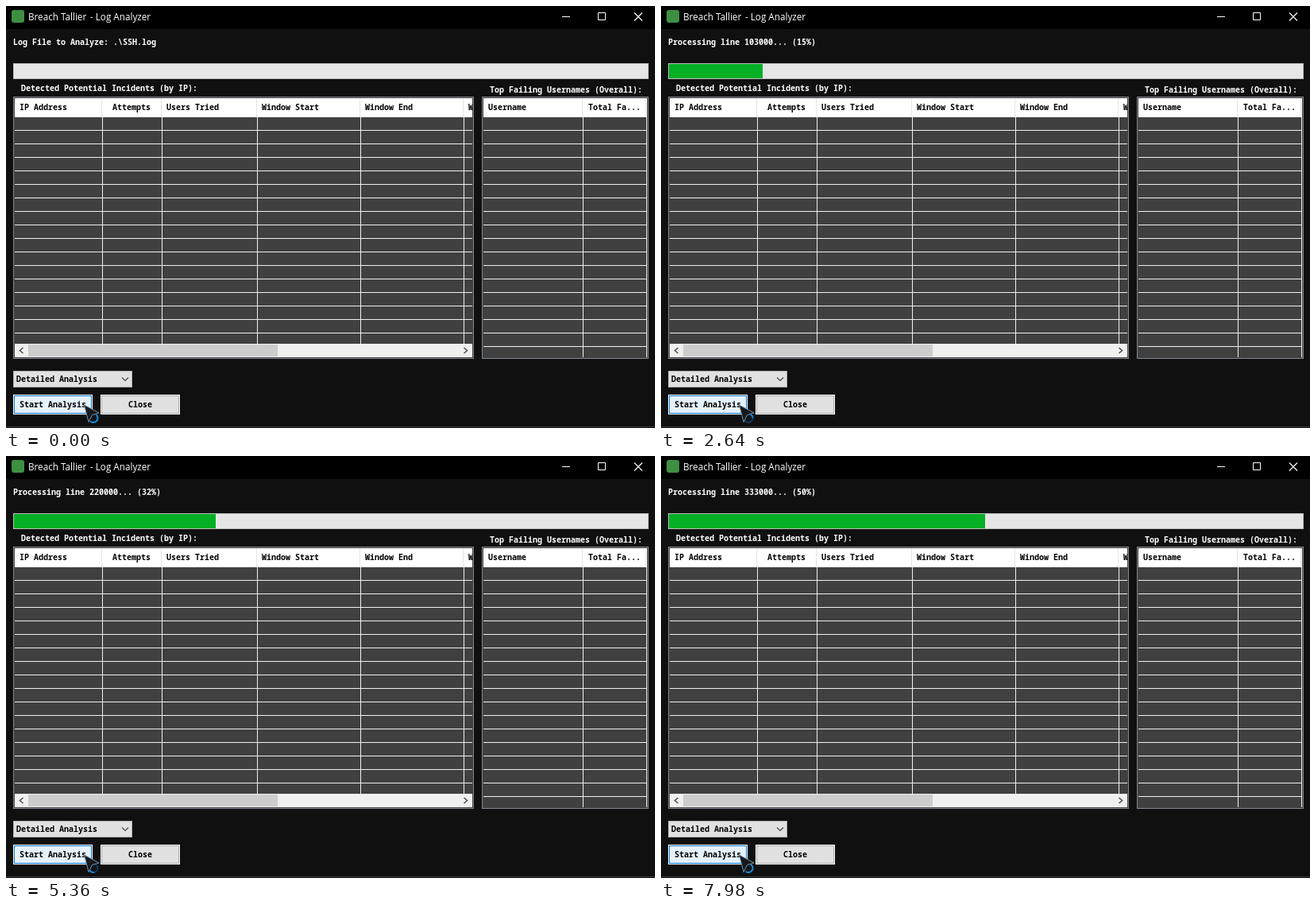
Animation, 817 px wide and 531 px high, one loop 8 s. Source, as an HTML page:

```html
<!DOCTYPE html>
<html lang="en">
<head>
<meta charset="utf-8">
<title>Breach Tallier - Log Analyzer</title>
<style>
  html, body { margin: 0; width: 100%; height: 100%; overflow: hidden; background: #101010; }
  svg { display: block; width: 817px; height: 531px; }
  text { font: bold 10px "Noto Sans Mono", "DejaVu Sans Mono", monospace; white-space: pre; }
  .title { font: 11.7px "Open Sans", "Noto Sans", sans-serif; }
</style>
</head>
<body>
<svg id="stage" viewBox="0 0 817 531" xmlns="http://www.w3.org/2000/svg"></svg>
<script>
const LOOP = 8000, STEP = 20;
const NS = "http://www.w3.org/2000/svg";
const stage = document.getElementById("stage");

function add(tag, attrs, parent = stage) {
  const el = document.createElementNS(NS, tag);
  for (const key in attrs) el.setAttribute(key, attrs[key]);
  return parent.appendChild(el);
}
const rect = (x, y, width, height, fill, parent) =>
  add("rect", { x, y, width, height, fill, "shape-rendering": "crispEdges" }, parent);
function label(x, y, str, fill = "#fff", cls = "") {
  const el = add("text", { x, y, fill, class: cls });
  el.textContent = str;
  return el;
}
const stroke = (d, color, width = 1, parent) =>
  add("path", { d, fill: "none", stroke: color, "stroke-width": width }, parent);
function box(x, y, w, h, border, fill) {
  rect(x, y, w, h, border);
  rect(x + 1, y + 1, w - 2, h - 2, fill);
}

// Window frame
rect(0, 0, 817, 531, "#101010");
rect(0, 0, 817, 29, "#000");
rect(0, 529, 817, 1, "#3a3d40");
add("rect", { x: 7, y: 5, width: 16, height: 16, rx: 3, fill: "#3f8f43" });
label(28, 18, "Breach Tallier", "#fff", "title");
label(106, 18, "- Log Analyzer", "#fff", "title");
rect(700, 13, 10, 1, "#fff");
stroke("M745.5 8.5h9v9h-9z", "#fff");
stroke("M791 8.500l10 10M801 8.500l-10 10", "#fff", 1.1);

// Status line and progress bar
const status = label(9, 49, "");
box(9, 72, 800, 20, "#bcbcbc", "#e6e6e6");
const bar = rect(10, 73, 0, 18, "#06b025");

// Tables
function table(x, w, seps, heads, rowsEnd, gridEnd) {
  box(x, 114, w, 330, "#828790", "#404040");
  const left = x + 2;
  rect(left, 116, w - 4, 24, "#fff");
  for (let y = 156; y < rowsEnd; y += 17) rect(left, y, gridEnd - left, 1, "#f0f0f0");
  for (const s of seps) {
    rect(s - 1, 116, 1, 23, "#e5e5e5");
    rect(s, 140, 1, rowsEnd - 140, "#f0f0f0");
  }
  for (const [hx, str] of heads) label(hx, 131, str, "#000");
}
label(19, 107, "Detected Potential Incidents (by IP):");
table(9, 580, [121, 196, 316, 446, 576], [
  [17, "IP Address"], [134, "Attempts"], [202, "Users Tried"],
  [322, "Window Start"], [452, "Window End"]
], 425, 587);
const clip = add("clipPath", { id: "edge" });
rect(577, 116, 10, 24, "#fff", clip);
label(582, 131, "Window", "#000").setAttribute("clip-path", "url(#edge)");
label(609, 109, "Top Failing Usernames (Overall):");
table(599, 210, [726, 806], [[607, "Username"], [733, "Total Fa..."]], 442, 807);

// Scrollbar
rect(11, 425, 576, 17, "#f0f0f0");
rect(28, 426, 314, 15, "#cdcdcd");
stroke("M21.500 430l-4 3.500l4 3.500M576.500 430l4 3.500l-4 3.500", "#505050", 1.6);

// Controls
box(9, 459, 150, 21, "#adadad", "#e1e1e1");
label(13, 473, "Detailed Analysis", "#000");
stroke("M146 467.500l4 4l4 -4", "#444", 1.1);
function button(x, str, textX, border, fill) {
  rect(x, 489, 100, 25, "#fff");
  box(x + 1, 490, 98, 23, border, fill);
  label(textX, 505, str, "#000");
}
button(9, "Start Analysis", 17, "#0078d7", "#e5f1fb");
button(119, "Close", 154, "#adadad", "#e1e1e1");

// Busy pointer
add("circle", { cx: 110, cy: 518.5, r: 5.5, fill: "#10151c", stroke: "#123a5c", "stroke-width": 1.8 });
const arc = stroke("M110 513a5.500 5.500 0 0 1 0 11", "#1c86d1", 2);
add("path", {
  d: "M98.500 502L117 512L108.500 514.500L104 523.500Z",
  fill: "#15181d", stroke: "#7190a8", "stroke-width": 1, "stroke-linejoin": "round"
});

// time (ms), thousands of lines, percent
const START = 380;
const pace = [
  [START, 0.5, 0], [1120, 34.5, 5.6], [1960, 73.5, 11.1], [3320, 132.5, 19.9],
  [4920, 201.5, 30.2], [5360, 220.5, 32.9], [6560, 270.8, 40.8],
  [6840, 282.5, 42.5], [7380, 306.6, 45.95], [LOOP - STEP, 333.5, 50.05]
];
function progress(t) {
  let i = 1;
  while (i < pace.length - 1 && t > pace[i][0]) i++;
  const a = pace[i - 1], b = pace[i];
  const k = (t - a[0]) / (b[0] - a[0]);
  return [1, 2].map(c => Math.floor(a[c] + (b[c] - a[c]) * k));
}

function statusText(t, lines, percent) {
  if (t < STEP) return "Log File to Analyze: .\\SSH.log";
  if (lines < 1) return "Starting analysis of .\\SSH.log...";
  return `Processing line ${lines * 1000}... (${percent}%)`;
}

function draw(ms) {
  const t = Math.floor((ms % LOOP) / STEP) * STEP;
  const [lines, percent] = t < START ? [0, 0] : progress(t);
  status.textContent = statusText(t, lines, percent);
  bar.setAttribute("width", Math.max(0, percent * 8 - 2));
  arc.setAttribute("transform", `rotate(${t * 0.36 + 40} 110 518.5)`);
}

const begin = performance.now();
function tick() {
  draw(performance.now() - begin);
  requestAnimationFrame(tick);
}
tick();
</script>
</body>
</html>
```
